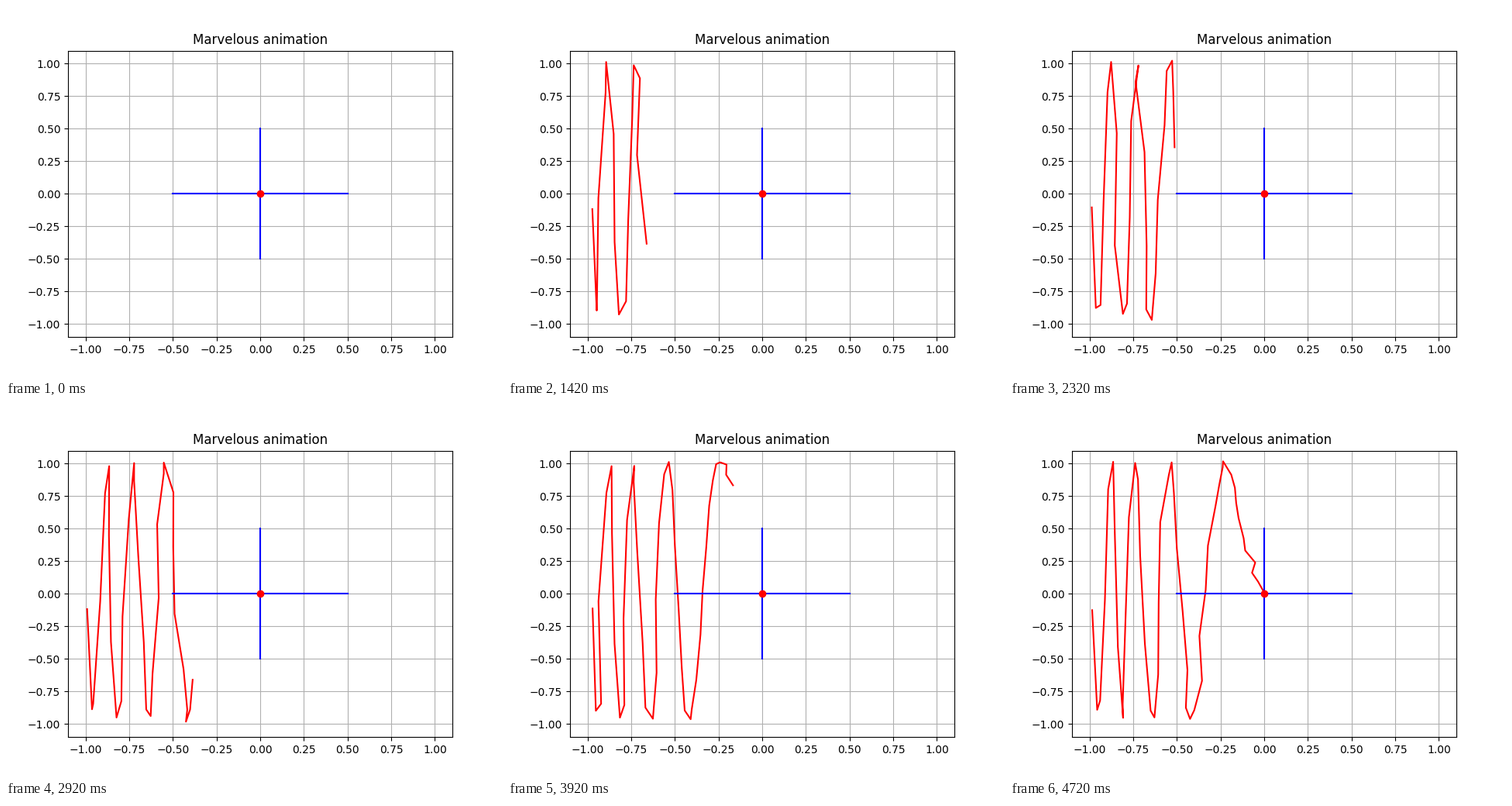
A matplotlib script that plays this animation: 640 by 480 pixels, repeating every 4.82 s.

```python
import numpy as np
import matplotlib.pyplot as plt
from matplotlib.animation import FuncAnimation

TICK = 20         # ms per drawn frame
HOLD = 5          # frames each pose is held; the first pose lasts one frame
POSES = 49
JITTER = 0.04

x = np.linspace(-1, 1, 100)
y = np.sin(25 * x**2)

fig, ax = plt.subplots(figsize=(6.4, 4.8), dpi=100)
ax.set(xlim=(-1.1, 1.1), ylim=(-1.1, 1.1), title="Marvelous animation")
ax.grid(True)

curve, = ax.plot([], [], "r")
ax.plot([-0.5, 0.5], [0, 0], "b")
ax.plot([0, 0], [-0.5, 0.5], "b")
ax.plot(0, 0, "ro")


def update(frame):
    """Show one more point per pose, with fresh jitter on all of them."""
    pose = (frame + HOLD - 1) // HOLD
    n = pose + 1
    dx, dy = np.random.default_rng(pose).uniform(0, JITTER, (2, n))
    curve.set_data(x[:n] + dx, y[:n] + dy)
    return curve,


anim = FuncAnimation(fig, update, frames=1 + HOLD * (POSES - 1),
                     interval=TICK, repeat=True, repeat_delay=0)
plt.show()
```
